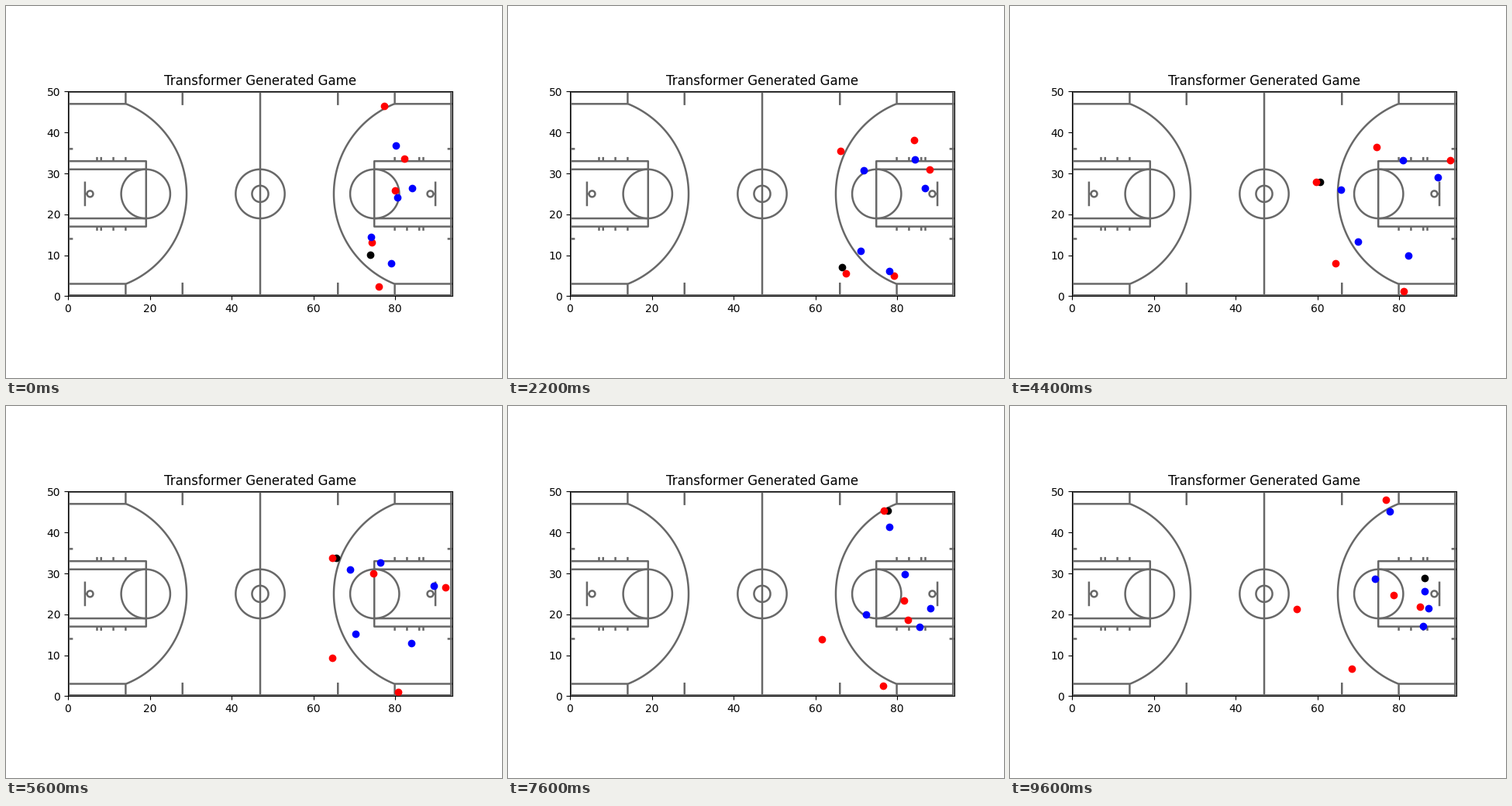
A matplotlib script that plays this animation: 640 by 480 pixels, repeating every 9800 ms.

```python
import numpy as np
import matplotlib.pyplot as plt
from matplotlib.animation import FuncAnimation
from matplotlib.collections import LineCollection

FRAMES, INTERVAL = 49, 200
LENGTH, WIDTH = 94, 50
SCALE = 496 / LENGTH  # pixels per foot
LEFT, BOTTOM = 80, 242.4 + WIDTH / 2 * SCALE
GRAY = "#686868"
now = np.arange(FRAMES)


def run(*points):
    """Smooth run through stage points that are evenly spaced in time."""
    pts = np.array(points, float)
    t = now * (len(pts) - 1) / (FRAMES - 1)
    i = np.minimum(t.astype(int), len(pts) - 2)
    u = (t - i)[:, None]
    vel = np.gradient(pts, axis=0, edge_order=2)
    ease = u * u * (3 - 2 * u)
    return ((1 - ease) * pts[i] + ease * pts[i + 1]
            + u * (1 - u) ** 2 * vel[i] - u * u * (1 - u) * vel[i + 1])


def guard(player, spot, start, end):
    """Stay between a player and a spot, closing in over time."""
    gap = np.linspace(start, end, FRAMES)[:, None]
    return player + gap * (spot - player)


def send(a, b, first, last):
    """Ease from path a to path b between two frames."""
    u = np.clip((now - first) / (last - first), 0, 1)[:, None]
    return a + (b - a) * u * u * (3 - 2 * u)


def to_court(path):
    return (path * (1, -1) + (-LEFT, BOTTOM)) / SCALE


wing = run((488, 129), (444, 170), (408, 212), (397, 224), (451, 162),
           (492, 129), (485, 121))
cutter = run((514, 197), (519, 182), (524, 162), (463, 192), (495, 238),
             (515, 254), (529, 259))
center = run((502, 238), (536, 221), (555, 198), (569, 205), (556, 263),
             (505, 275), (495, 244))
corner = run((472, 305), (504, 360), (500, 367), (441, 339))
passer = run((481, 362), (424, 338), (418, 318), (370, 262))
offense = [wing, cutter, center, corner, passer]

defense = [
    guard(wing, np.array([530, 270]), 0.36, 0.1),
    run((524, 235), (518, 200), (536, 201), (497, 199), (479, 207),
        (522, 221), (535, 239)),
    run((505, 247), (540, 234), (553, 222), (546, 258), (540, 261)),
    run((471, 298), (454, 316), (449, 301), (460, 276), (471, 223)),
    run((497, 332), (493, 341), (518, 317), (530, 287), (533, 284)),
]

# The ball goes to the passer, across to the wing, then to the basket.
ball = send(np.array([470, 321]), passer + (-5, -8), 0, 7)
ball = send(ball, wing + (5, 0), 15, 22)
ball = send(ball, np.array([535, 222]), 42, 48)


def arc(cx, cy, r, start=0, end=2 * np.pi):
    a = np.linspace(start, end, 121)
    return np.column_stack([cx + r * np.cos(a), cy + r * np.sin(a)])


def half_court():
    """Line work of the left half."""
    reach = np.arcsin(22 / 23.75)
    lines = [
        arc(5.25, 25, 23.75, -reach, reach),
        arc(19, 25, 6),
        arc(5.4, 25, 0.75),
        [(4.15, 22), (4.15, 28)],
        [(4.15, 25), (4.75, 25)],
        [(0, 17), (19.1, 17), (19.1, 33), (0, 33)],
    ]
    for side in (-1, 1):
        def across(x, near, far):
            return [(x, 25 + side * near), (x, 25 + side * far)]

        def along(y, end):
            return [(0, 25 + side * y), (end, 25 + side * y)]

        lines += [along(22, 14.2), along(6, 19.1), along(11, 1.2)]
        lines += [across(14.1, 22, 25), across(28, 21.7, 25)]
        lines += [across(x, 8, 9) for x in (7.1, 8.1, 11.1, 14.1)]
    return [np.array(line, float) for line in lines]


def draw_court(ax):
    left = half_court()
    right = [line * (-1, 1) + (LENGTH, 0) for line in left]
    x0, x1, y0, y1 = 0.15, 93.7, 0.2, 49.95
    middle = [
        [(47, 0), (47, 50)], arc(47, 25, 6), arc(47, 25, 2),
        [(x0, y0), (x1, y0), (x1, y1), (x0, y1), (x0, y0)],
    ]
    lines = LineCollection(left + right + middle, colors=GRAY,
                           linewidths=1.8, zorder=1)
    lines.set_snap(False)
    ax.add_collection(lines)


plt.rcParams["font.family"] = "DejaVu Sans"
fig, ax = plt.subplots(figsize=(6.4, 4.8), dpi=100)
ax.set_aspect("equal")
ax.set(xlim=(0, LENGTH), ylim=(0, WIDTH),
       xticks=range(0, 81, 20), yticks=range(0, 51, 10))
ax.set_title("Transformer Generated Game")
draw_court(ax)

groups = []
for color, paths in (("black", [ball]), ("red", offense), ("blue", defense)):
    dots, = ax.plot([], [], "o", color=color, markersize=6)
    groups.append((dots, np.array([to_court(p) for p in paths])))


def update(frame):
    for dots, tracks in groups:
        dots.set_data(tracks[:, frame, 0], tracks[:, frame, 1])
    return [dots for dots, _ in groups]


anim = FuncAnimation(fig, update, frames=FRAMES, interval=INTERVAL,
                     repeat=True, repeat_delay=0)
plt.show()
```
